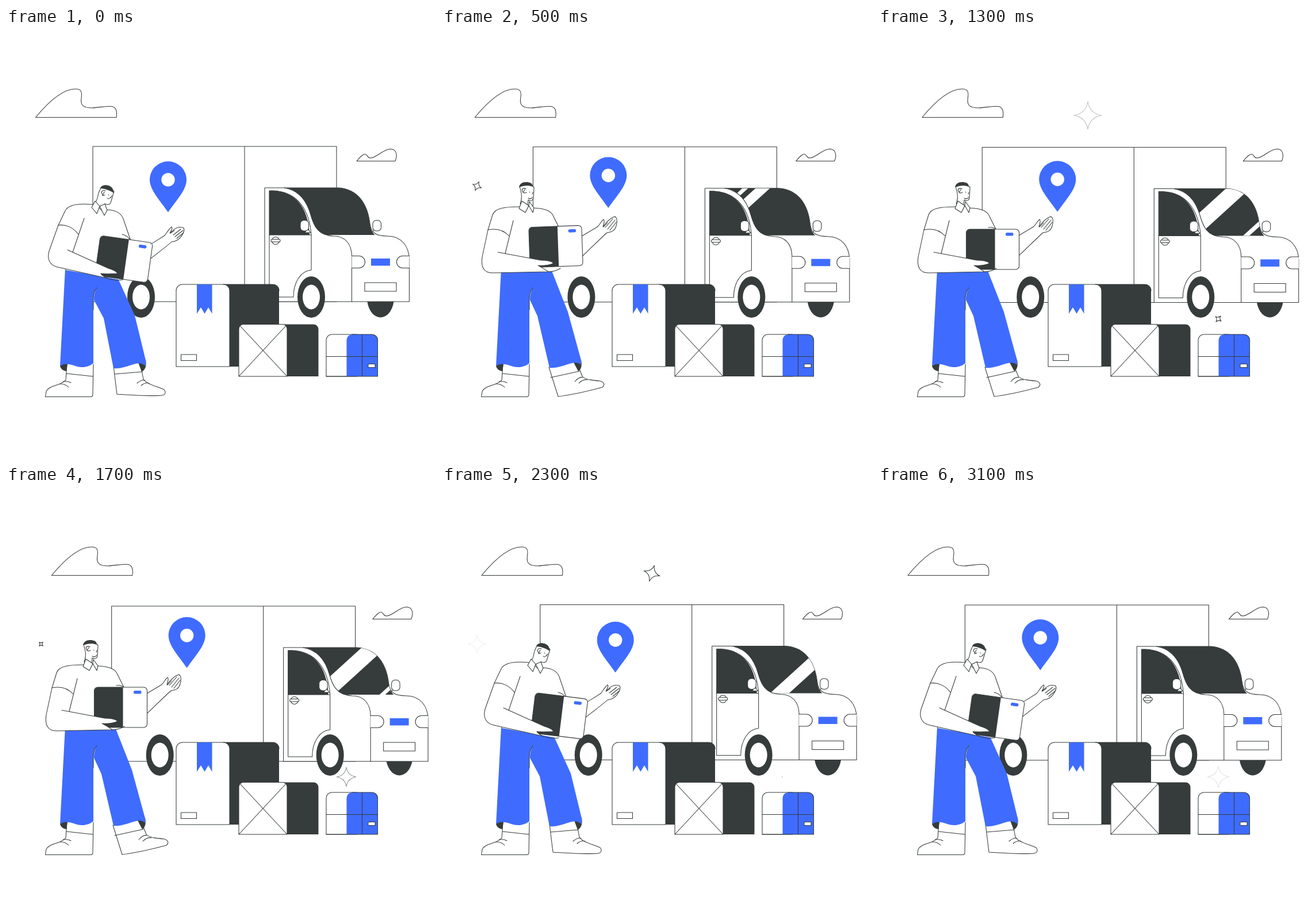
Animation of 748 by 748 pixels, one loop 3.2 s. Source, as an HTML page:

```html
<!DOCTYPE html>
<html lang="en">
<head>
<meta charset="utf-8">
<title>Delivery</title>
<style>
  html, body { margin: 0; width: 100%; height: 100%; overflow: hidden; background: #fff; }
  svg { display: block; width: 100vw; height: 100vh; }
  svg * { vector-effect: non-scaling-stroke; }
  .l { fill: none; stroke: #353b3a; stroke-width: 1.05; stroke-linejoin: round; stroke-linecap: round; }
  .w { fill: #fff; stroke: #353b3a; stroke-width: 1.05; stroke-linejoin: round; stroke-linecap: round; }
  .p { fill: #fff; }
  .d { fill: #363c3b; }
  .b { fill: #3f6cff; }
</style>
</head>
<body>
<svg viewBox="0 0 748 748">
  <defs>
    <path id="glass" d="M486 278H578C612 280 629 306 633 340C634 350 637 356 642 360H556C542 356 535 343 530 325C523 300 508 282 486 278Z"/>
    <clipPath id="pane"><use href="#glass"/></clipPath>
    <path id="spark" d="M0 -1Q.14 -.14 1 0Q.14 .14 0 1Q-.14 .14 -1 0Q-.14 -.14 0 -1Z"/>
    <g id="wheel">
      <ellipse class="d" rx="24" ry="36"/>
      <ellipse class="p" rx="15" ry="21.5"/>
    </g>
  </defs>

  <g id="clouds">
    <path class="w" d="M51.500 155.500C75 127 100 106 121 106C130 106 133 110 131 122C129 135 135 139 150 139C165 138 178 135 185 136.500C193 139 193 147 192 155.500Z"/>
    <path class="w" d="M610 231.500C615 226 620 219 625 219.500C629 220 628 226 634 226C645 226 656 210.500 669 210.500C680 211 681 222 677 231.500Z"/>
  </g>

  <g id="farWheel"><ellipse class="d" cx="651.500" cy="469" rx="23.500" ry="34.500"/></g>
  <g id="truck">
    <path class="w" d="M151 206H575V476H151ZM415 206V476"/>
    <path class="w" d="M450 476V278H578C612 280 629 306 633 340C635 356 643 362 664 362C688 362 701 380 701.500 402V476Z"/>
    <use href="#glass" class="d"/>
    <g clip-path="url(#pane)"><path id="thick" class="p"/><path id="thin" class="p"/></g>
    <path class="l" d="M484 278C509 282 523 300 530 325C535 343 542 361 570 362C590 362 601 376 601.500 396V476"/>
    <path class="d" d="M458 283H465C507 285 526 316 528 360H458Z"/>
    <path class="l" d="M458 283H465C507 285 528 316 531 360V421C514 422 500 441 500 468H458Z"/>
    <path class="l" d="M458 360H531"/>
    <g class="w">
      <circle cx="469" cy="370" r="6.500"/>
      <rect x="461" y="367.500" width="16" height="4.500" rx="2"/>
      <path d="M524 349L530 356H521"/>
      <rect x="512" y="334.500" width="14.500" height="18.500" rx="6"/>
      <path d="M641 350L637 356"/>
      <rect x="638" y="334.500" width="14.500" height="18.500" rx="6"/>
      <path d="M601.500 396.500H614A10.500 10.500 0 0 1 614 417.500H601.500M701.500 396.500H690A10.500 10.500 0 0 0 690 417.500H701.500"/>
      <rect x="624" y="443" width="55" height="15"/>
    </g>
    <rect class="b" x="635" y="401" width="33" height="12.500"/>
  </g>
  <g id="wheels">
    <use href="#wheel" x="235" y="468"/>
    <use href="#wheel" x="531" y="468"/>
  </g>
  <g id="pin">
    <path class="b" d="M282 320.500C268 300 250 282 250 264A32 32 0 0 1 314 264C314 282 296 300 282 320.500Z"/>
    <circle class="p" cx="282" cy="264" r="11.700"/>
  </g>

  <path class="d" d="M375 446H464A11 11 0 0 1 475 457V589H375Z"/>
  <path class="w" d="M296 589V457A11 11 0 0 1 307 446H378A11 11 0 0 1 389 457V589Z"/>
  <path class="l" d="M378 446H464A11 11 0 0 1 475 457"/>
  <path class="b" d="M332 446H358.500V497L352 486L345.500 497L339 486L332 497Z"/>
  <rect class="w" x="304.500" y="568" width="27" height="10.500"/>

  <path class="d" d="M480 515.500H535A8.500 8.500 0 0 1 543.500 524V606H480Z"/>
  <path class="w" d="M405 606V523A8 8 0 0 1 413 515.500H481A8 8 0 0 1 489 523V606ZM407 518L489 606M487 518L405 606"/>

  <path class="w" d="M557 606V543A10 10 0 0 1 567 533H610V606Z"/>
  <path class="b" d="M592.500 606V543A10 10 0 0 1 602 533H636A10 10 0 0 1 646.500 543V606Z"/>
  <path class="l" d="M557 571.500H646.500M619.500 533V606M602 533H636A10 10 0 0 1 646.500 543V606H557"/>
  <rect class="w" x="630" y="584.500" width="12" height="6"/>

  <g id="lower"></g>
  <g id="parcel">
    <rect class="w" x="-46" y="-35" width="92" height="70" rx="6"/>
    <path class="d" d="M4 -35H-39A7 7 0 0 0 -46 -28V28A7 7 0 0 0 -39 35H4Z"/>
    <rect class="b" x="22.500" y="-29" width="13.500" height="5.500" rx="2.500"/>
  </g>
  <g id="upper"></g>
  <g id="sparks"></g>
</svg>
<script>
const LOOP = 3200;
const $ = id => document.getElementById(id);
const clamp = v => Math.max(0, Math.min(1, v));

function add(parent, tag, attrs) {
  const el = document.createElementNS('http://www.w3.org/2000/svg', tag);
  for (const k in attrs) el.setAttribute(k, attrs[k]);
  return parent.appendChild(el);
}

// Rows are [time, ...values]; values ease from row to row.
function sample(rows, t) {
  let i = 1;
  while (i < rows.length - 1 && rows[i][0] < t) i++;
  const a = rows[i - 1], b = rows[i];
  let k = clamp((t - a[0]) / (b[0] - a[0]));
  k = k * k * (3 - 2 * k);
  return a.slice(1).map((v, j) => v + (b[j + 1] - v) * k);
}

// Blends two paths that share the same commands.
function blend(a, b, k) {
  const end = b.match(/-?[\d.]+/g);
  let i = 0;
  return a.replace(/-?[\d.]+/g, n => (+n + (end[i++] - n) * k).toFixed(2));
}

// [class, leaning pose, upright pose]
const legs = [
  ['w', 'M106 585L104 612C98 622 75 621 70 632L68.5 641.5H148Q151 641 151 637L152 585'],
  ['l', 'M105 601L151 606M94 619Q103 619 109 625M99 615Q107 614 113 617'],
  ['w', 'M187 588L193 637C230 639 260 641 272 639C278 638 278 632 275 629C262 623 245 620 239 611L234 585',
        'M186 590L202 641C230 638 255 631 279 625C284 621 282 616 275 614C262 613 250 612 244 606L235 583'],
  ['l', 'M189 602L237 598M228 618Q236 611 242 613M235 622Q242 616 249 618',
        'M189 608L239 597M231 615Q239 606 245 608M238 618Q246 610 253 612'],
  ['d', 'M94 588C97 582 104 581 107 584L105 597C98 596 95 592 94 588Z'],
  ['d', 'M243 577C238 576 232 578 230 582L236 598C242 595 245 588 243 577Z',
        'M242 577C237 576 231 578 229 582L237 597C242 594 244 588 242 577Z'],
  ['b', 'M103 418L94 588C104 581 114 586 124 589C136 592 146 588 152 583V470C152 462 155 456 158 452C154 460 153 465 153 473L170 505L187 592C200 593 212 588 222 585C232 582 238 584 243 588L243 578L224 500L194 434Z',
        'M103 418L94 588C104 581 114 586 124 589C136 592 146 588 152 583V470C152 462 155 456 158 452C154 460 153 465 153 473L166 501L187 591C200 592 212 587 222 584C232 581 238 582 242 586L242 578L219 494L190 420Z'],
  ['l', 'M158 452C154 457 152 463 152 470V490']
];
const torso = [
  ['w', 'M244 381L276 361C280 356 283 350 288 346C290 347 288 352 285 357C292 350 298 345 306 347L308 347C311 349 310 353 308 357C304 366 298 371 288 372C282 378 268 388 244 407',
        'M240 364L270 346C275 342 276 337 281 333C284 334 281 341 280 346C285 339 291 332 298 329L301 328C305 331 305 337 303 344C301 352 296 355 287 356C280 362 264 378 240 401'],
  ['l', 'M291 360L304 350M294 363L308 352M286 357L293 352M297 366L309 356',
        'M284 347L297 332M288 350L301 334M281 346L288 339M292 352L303 338'],
  ['p', 'M151 307C130 305 109 306 103 318L91 343L107 386L104 421L198 438L216 370L204 332C200 323 190 318 173 315Z',
        'M135 311C110 311 92 313 88 325L80 351L97 390L103 423L192 424L206 352L194 328C190 317 178 314 159 313Z'],
  ['l', 'M151 307C130 305 109 306 103 318L91 343C105 341 118 348 126 359M136 331L116 390M175 316C192 317 200 322 204 332L217 370M202 359C208 360 213 364 216 369',
        'M135 311C110 311 92 313 88 325L80 351C95 348 108 352 117 362M124 335L110 392M159 313C178 314 190 317 194 328L207 354M192 347C198 346 203 348 206 351'],
  ['w', 'M161 287C160 294 158 300 155 306L166 317L172 306C177 308 181 307 182 304L188 284C180 276 170 274 165 278Z',
        'M138 288C139 294 138 300 136 306L148 315L150 299C154 302 158 300 159 296L160 277C152 270 140 270 135 275Z'],
  ['d', 'M164 279C165 274 173 272 178 274C184 276 187 279 187 287C182 283 174 280 165 279Z',
        'M134 277C135 271 140 268 146 268C153 268 158 270 158 276C150 273 142 274 134 277Z'],
  ['l', 'M173 283C168 281 165 285 167 288C168 291 170 293 172 290M171 285L168 292M176 296C178 298 181 297 182 294M178 290L179 291M184 292L182 295',
        'M146 280C141 277 138 281 140 284C141 287 144 288 147 286M144 281L141 286M150 296C153 298 156 297 158 294M152 285L153 286M158 286L157 289'],
  ['w', 'M155 301L149 312L158 323L163 310ZM163 310L171 326L176 317L172 306Z',
        'M139 301L134 314L145 321L151 309ZM151 309L158 321L160 313L152 302Z']
];
const nearArm = [
  ['w', 'M91 343L75 388C71 402 76 413 90 416L175 435C168 431 165 428 165 427C178 429 188 427 194 427C192 423 185 420 178 418L107 386',
        'M80 351L70 398C67 416 73 426 88 426L185 424C175 417 168 414 167 413C178 414 190 412 194 409C190 405 180 404 172 404L97 390'],
  ['l', 'M175 435C184 438 194 440 203 438', 'M185 424C192 424 200 422 206 418']
];

const moving = [];
function build(parent, parts) {
  for (const [cls, lean, upright] of parts) {
    const el = add(parent, 'path', { class: cls, d: lean });
    if (upright) moving.push({ el, lean, upright });
  }
}
build($('lower'), legs);
build($('lower'), torso);
build($('upper'), nearArm);

const pose = [[0, 0], [60, 0], [450, 1], [1800, 1], [2250, 0], [LOOP, 0]];
const parcel = [[0, 205, 402, 8], [60, 205, 402, 8], [500, 198, 380, -2], [800, 199.5, 385, 0],
  [1800, 199.5, 385, 0], [2300, 204, 400, 7], [2700, 205.5, 403, 8.5], [3100, 205, 402, 8], [LOOP, 205, 402, 8]];
const bounce = [[0, 0], [250, 2], [500, .7], [900, 0], [1300, 1.5], [1700, 3], [2300, .5], [2700, 0], [3100, 1], [LOOP, 0]];
const hover = [[0, 0], [500, -7.5], [900, 2.5], [1700, -4], [2300, 4], [2700, 0], [LOOP, 0]];
// Left edge at y = 320 and width of each reflection.
const glare = {
  thick: [[0, 400, 25], [100, 400, 25], [500, 492, 25], [900, 517, 42], [1700, 540, 42], [2300, 595, 33], [2700, 556, 30], [3050, 400, 25], [LOOP, 400, 25]],
  thin: [[0, 390, 10], [100, 390, 10], [500, 469, 10], [900, 636, 12], [1700, 661, 10], [2300, 700, 10], [2700, 527, 13], [3050, 390, 10], [LOOP, 390, 10]]
};
const sparks = [
  { x: 61, y: 275, size: 15, starts: [110, 1480] },
  { x: 365, y: 152, size: 23, starts: [570, 1860] },
  { x: 592, y: 506, size: 18, starts: [1050, 2300] }
].map(s => ({ ...s, el: add($('sparks'), 'use', { href: '#spark', class: 'w' }) }));

const wave = t => (1 - Math.cos(2 * Math.PI * t / LOOP)) / 2;
const move = (id, x, y) => $(id).setAttribute('transform', `translate(${x} ${y})`);

function drawSpark({ el, x, y, size, starts }, t) {
  const start = starts.find(s => t >= s && t < s + 850);
  const age = start === undefined ? 0 : t - start;
  const turn = 45 * (1 - clamp((age - 200) / 400));
  const scale = size * Math.min(age / 700, 1.05);
  el.setAttribute('transform', `translate(${x} ${y}) rotate(${turn}) scale(${scale})`);
  el.setAttribute('opacity', age ? clamp((850 - age) / 350) : 0);
}

function draw(t) {
  const drive = 33 * wave(t);
  move('clouds', 28 * wave(t - 25), 0);
  move('truck', drive, sample(bounce, t)[0]);
  move('wheels', drive, 0);
  move('farWheel', drive, 0);
  move('pin', drive, sample(hover, t)[0]);

  for (const id in glare) {
    const [x, w] = sample(glare[id], t);
    $(id).setAttribute('d', `M${x - 55} 370L${x + 55} 270H${x + 55 + w}L${x - 55 + w} 370Z`);
  }

  const k = sample(pose, t)[0];
  for (const m of moving) m.el.setAttribute('d', blend(m.lean, m.upright, k));
  const [x, y, turn] = sample(parcel, t);
  $('parcel').setAttribute('transform', `translate(${x} ${y}) rotate(${turn})`);

  for (const s of sparks) drawSpark(s, t);
}

const begin = performance.now();
function frame() {
  draw((performance.now() - begin) % LOOP);
  requestAnimationFrame(frame);
}
frame();
</script>
</body>
</html>
```
